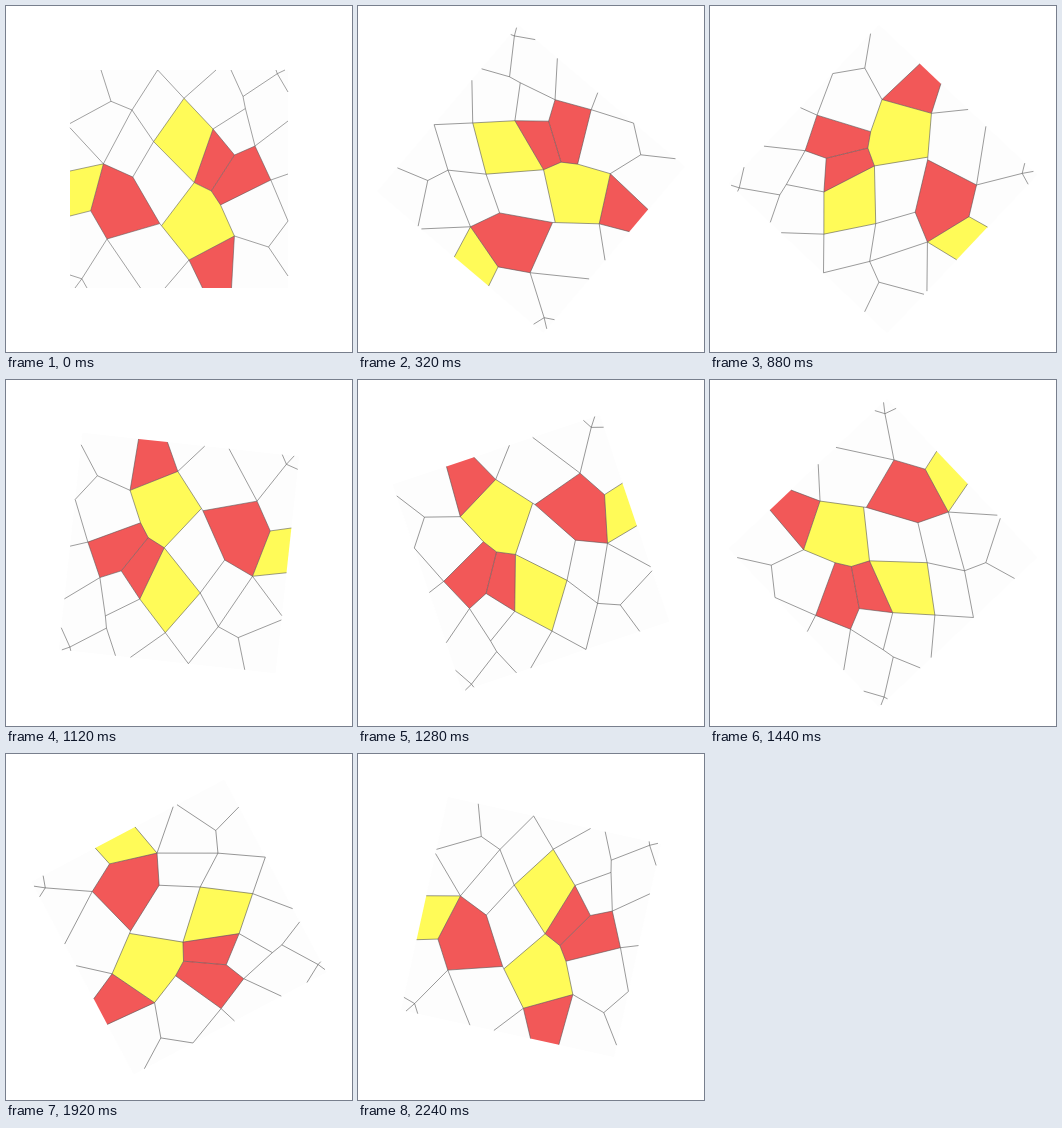
Recreate the animation shown at these times as an HTML page. Size 346x346 px, loop 2320 ms.

```html
<!DOCTYPE html>
<html lang="en">
<head>
<meta charset="utf-8">
<title>Rotating mosaic</title>
<style>
  html, body { margin: 0; width: 100%; height: 100%; overflow: hidden; background: #fff; }
  svg { display: block; width: 100%; height: 100%; }
  .paper { fill: #fdfdfd; }
  .red { fill: #f25858; }
  .yellow { fill: #fffb58; }
  #edges { fill: none; stroke: #555; stroke-width: .55; }
</style>
</head>
<body>
<svg viewBox="0 0 346 346">
  <g id="tile">
    <rect class="paper" x="64" y="64" width="218" height="218"/>
    <g id="cells"></g>
    <path id="edges"/>
  </g>
</svg>
<script>
// Shared corners of the mosaic
const P = {
  A: [178, 92.3], B: [207, 123], C: [188.2, 176.6], D: [147.6, 135.6],
  E: [228.5, 149], F: [205.3, 185], G: [249, 140], H: [264.8, 174],
  I: [214.5, 198.9], J: [228.4, 230], K: [183, 254], L: [153.8, 217.6],
  M: [97.4, 157.8], N: [126.8, 171], O: [101, 233], P: [84.7, 204.8],
  Q: [105, 95.3], R: [126, 104], S: [237, 90.5], T: [239.4, 102.5],
  U: [271.3, 67.7], W: [282, 215], X: [262.5, 241], Y: [75.8, 272.8],
  Z: [155.5, 219.7],
  // Points on the border of the square
  a: [95, 64], b: [151.7, 64], c: [210, 64], d: [225, 64],
  e: [270, 64], f: [279, 64], g: [282, 86], h: [282, 115],
  i: [282, 168], j: [282, 270], k: [225.5, 282], l: [196.5, 282],
  m: [159, 282], n: [134.5, 282], o: [81, 282], p: [69, 282],
  q: [64, 269], r: [64, 210], s: [64, 165], t: [64, 121.8], u: [64, 117.5]
};

const cells = [
  ["yellow", "ABCD"], ["yellow", "CFIJKZ"], ["yellow", "MPrs"],
  ["red", "BEFC"], ["red", "EGHIF"], ["red", "JKlk"], ["red", "MNLOP"]
];

const chains = [
  "ABCDA", "BEFC", "EGHIF", "IJKZC", "ZL", "Jk", "Kl", "MNLOPM",
  "Ms", "Pr", "aQRM", "Qu", "Mt", "RbAc", "RDN", "dSTG", "TB", "SUf",
  "eUg", "Gh", "Hi", "HWXJ", "Xj", "Km", "On", "OYp", "qYo"
];

const trace = keys => "M" + [...keys].map(key => P[key]).join("L");

for (const [tone, keys] of cells) {
  const cell = document.createElementNS("http://www.w3.org/2000/svg", "path");
  cell.setAttribute("class", tone);
  cell.setAttribute("d", trace(keys) + "Z");
  document.getElementById("cells").append(cell);
}
document.getElementById("edges").setAttribute("d", chains.map(trace).join(""));

// One counter-clockwise turn in 29 steps; redrawing keeps the thin lines sharp
const STEPS = 29, STEP_MS = 80;
const tile = document.getElementById("tile");
const start = performance.now();

function draw(now) {
  const step = Math.floor(Math.max(0, now - start) / STEP_MS) % STEPS;
  tile.setAttribute("transform", `rotate(${-360 * step / STEPS} 173 173)`);
  requestAnimationFrame(draw);
}
draw(start);
</script>
</body>
</html>
```
